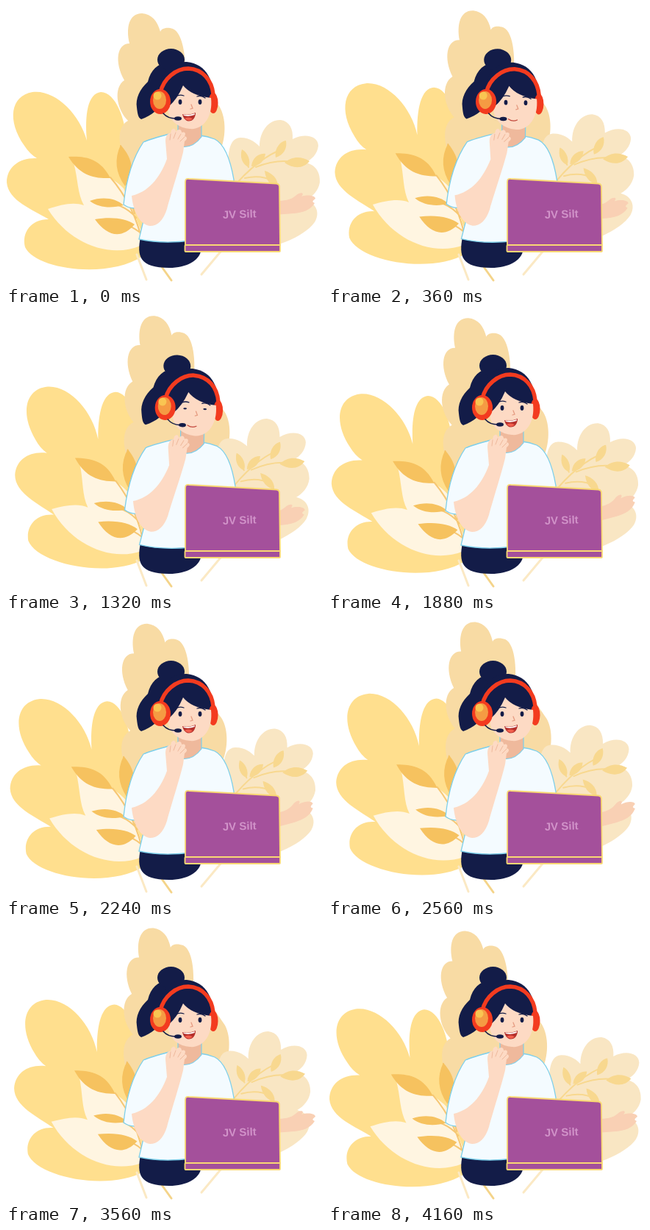
These frames come from a looping animation (430x378 px, 4.2 s). An HTML page:

```html
<!DOCTYPE html>
<html lang="en">
<head>
<meta charset="utf-8">
<title>Support agent</title>
<style>
html, body { margin: 0; width: 100%; height: 100%; overflow: hidden; background: #fff; }
svg { display: block; }
.line { fill: none; stroke-linecap: round; }
.navy { fill: #131c48; }
.red { fill: #f33b1f; }
.skin { fill: #fddac4; }
.gold { fill: #f6c25f; }
.sprig { fill: #f8d88f; }
</style>
</head>
<body>
<svg width="430" height="378" viewBox="0 0 430 378">
  <g id="leftLeaf" fill="#ffdf8e">
    <path d="M110 183C100 146 66 113 36 117C6 122 1 156 25 190Q32 201 42 207C18 206 1 219 1 240C3 265 37 277 58 290C34 290 21 308 26 328C40 358 138 372 186 340L190 260L164 190C164 155 149 117 129 117C111 119 107 148 110 183Z"/>
  </g>
  <g id="backLeaf" fill="#f8dba4">
    <path d="M185 10C167 10 163 30 168 51C151 51 147 76 161 101C146 111 150 140 166 156C150 165 152 190 165 215L230 300L290 200C300 180 300 152 290 136L262 100L243 100C246 78 242 37 227 31C218 28 211 31 210 35C206 20 198 11 185 10Z"/>
  </g>
  <g id="sideStem">
    <path fill="#fff5e1" d="M92 213C112 218 145 232 160 248L184 306L183 326C140 344 85 322 57 276C75 270 92 266 106 271C97 255 98 235 92 213Z"/>
    <path class="line" stroke="#f6c774" stroke-width="2" d="M142 233Q174 270 186 322M156 190Q161 240 175 282M120 267Q158 265 177 288M126 293Q160 291 181 307"/>
    <path class="gold" d="M85 205C108 204 128 207 142 234C119 235 100 230 85 205ZM156 189C147 208 149 227 162 245C175 227 174 209 156 189ZM114 265C131 259 149 261 160 271C144 275 127 275 114 265ZM121 290C144 286 164 289 175 297C158 317 138 314 121 290Z"/>
  </g>
  <g id="rightLeaf" fill="#f9e6c3">
    <path d="M300 230C304 212 299 180 319 179C333 179 341 187 345 191C345 170 358 154 374 155C386 157 391 167 390 181C407 172 425 177 425 190C424 201 416 209 407 213C420 215 428 225 427 240C425 252 416 260 408 264C424 269 427 283 420 294C406 314 360 333 320 333Z"/>
  </g>
  <g id="sprig">
    <path class="line" stroke="#f8d88f" stroke-width="2" d="M306 250Q343 206 378 194M330 219L325 208M343 211L347 204M340 219Q370 207 397 213M325 234Q347 229 364 238"/>
    <path class="sprig" d="M321 195C329 199 334 211 330 219C321 215 318 205 321 195ZM353 201C346 200 335 205 334 218C345 218 352 210 353 201ZM381 183C373 184 365 194 367 206C378 203 383 193 381 183ZM379 213C389 204 402 204 413 211C405 221 392 222 379 213ZM352 224C362 227 371 235 370 247C360 245 353 236 352 224Z"/>
  </g>
  <path class="line" stroke="#fbe9c4" stroke-width="3" d="M178 338L191 372M266 365L292 334"/>
  <path class="line" stroke="#f4d48a" stroke-width="3" d="M205 345L225 373"/>
  <path class="navy" d="M183 314C178 340 181 356 222 356C246 356 262 346 265 334V314Z"/>
  <path id="palm" fill="#f9d0b4" d="M366 265C379 265 387 264 394 258C401 252 407 254 402 259C411 256 421 258 421 262C417 265 416 266 420 268C414 278 403 281 392 282L366 284Z"/>
  <g id="torso">
    <path fill="#f4fbff" stroke="#7dcfea" stroke-width="1.3" d="M222 174C207 178 196 181 187 185C170 210 163 241 160 270Q167 275 175 275L187 292L181 317Q212 324 252 319H310V236C305 207 296 187 284 181Q274 177 264 176Z"/>
    <path fill="#efb99c" stroke="#7dcfea" stroke-width="1.2" d="M234 160V190Q252 196 266 178V155Z"/>
  </g>
  <g id="head">
    <path class="navy" d="M222 76C206 78 197 87 193 103C182 113 176 126 178 138C179 147 180 152 184 154C198 149 209 140 216 126L240 85Z"/>
    <ellipse class="navy" cx="224.500" cy="73" rx="18.500" ry="15"/>
    <path class="navy" d="M207 130C205 95 221 75 246 76C273 79 285 101 281 137H215Z"/>
    <ellipse class="red" cx="282" cy="132" rx="6.500" ry="14"/>
    <path class="skin" d="M221 137Q233 127 241 108Q252 122 279 125C282 151 268 169 250 167C236 166 225 158 221 145Z"/>
    <path class="line" stroke="#f33b1f" stroke-width="5.500" d="M210 118C214 98 232 85 248 85C268 86 280 101 282 120"/>
    <ellipse class="red" cx="210" cy="130" rx="14" ry="17"/>
    <ellipse cx="209" cy="128" rx="9" ry="12" fill="#f59b43"/>
    <circle cx="206" cy="122" r="5.5" fill="#f9c552"/>
    <path class="line" stroke="#131c48" stroke-width="1.5" d="M214 146Q220 153 231 153"/>
    <ellipse class="navy" cx="234" cy="153" rx="5" ry="2.7"/>
    <path class="line" stroke="#131c48" stroke-width="1.3" d="M231 123Q236 120 242 122M260 123Q266 121 271 125"/>
    <path class="line" stroke="#e59c82" stroke-width="1.3" d="M252 134L254 139L251 140"/>
    <ellipse class="navy eye" cx="237" cy="130.500" rx="2.4" ry="3.4"/>
    <ellipse class="navy eye" cx="264" cy="130.500" rx="2.4" ry="3.4"/>
    <g id="talk">
      <path fill="#b5302c" d="M240 147Q249 149 258 145C258 152 254 157 248 156.500C244 156 241 152 240 147Z"/>
      <path fill="#fff" d="M241 147.500Q249 149 257 146L256.500 148Q249 151 242 149Z"/>
      <path fill="#f2604e" d="M243 153Q249 150 254 153.500Q249 158 243 153Z"/>
    </g>
    <path id="smile" class="line" stroke="#c2473c" stroke-width="1.2" d="M241 153Q247 157 253 154"/>
  </g>
  <g id="arm">
    <path class="skin" d="M171 258C193 253 209 235 219 208L217 184C217 176 221 172 224 173L225 169C228 165 231 167 231 171C235 166 239 168 239 172C244 170 245 174 243 177C248 178 246 182 243 184L241 199C236 220 224 257 219 276C214 292 206 299 196 299C181 297 173 278 171 258Z"/>
    <path class="line" stroke="#efb99c" stroke-width="1" d="M224 174L223 182M231 172L228 180M238 174L234 181M243 178L237 184"/>
  </g>
  <g fill="#a4509b" stroke="#f9d873" stroke-width="1.8" stroke-linejoin="round">
    <path d="M244 239Q244 234 249 235L368 241.500Q372 242 372 246L373 325H244Z"/>
    <rect x="243.500" y="325" width="129.500" height="9" rx="1"/>
  </g>
  <text transform="translate(295 289) rotate(-2)" font-family="'Liberation Sans', Arial, sans-serif" font-weight="700" font-size="15" fill="#d193c9">JV Silt</text>
</svg>
<script>
const LOOP = 4200, SPLIT = 2060;
const $ = id => document.getElementById(id);
const eyes = document.querySelectorAll('.eye');

const smooth = (a, b, t) => {
  const u = Math.min(1, Math.max(0, (t - a) / (b - a)));
  return u * u * (3 - 2 * u);
};
const turn = (id, deg, x, y, shift = '') =>
  $(id).setAttribute('transform', `${shift}rotate(${deg} ${x} ${y})`);

// Leaves spring up quickly, then sink back
function sway(t) {
  const len = t < SPLIT ? SPLIT : LOOP - SPLIT;
  const u = (t < SPLIT ? t : t - SPLIT) / len, peak = 0.47;
  return u < peak
    ? 1 - (1 - u / peak) ** 2.4
    : Math.cos(Math.PI / 2 * (u - peak) / (1 - peak)) ** 0.85;
}

function draw(t) {
  const s = sway(t);
  turn('backLeaf', 4.2 * s, 267, 270);
  turn('leftLeaf', 5 * s, 245, 375);
  turn('sideStem', 3.4 * s, 210, 370);
  turn('rightLeaf', -3.6 * s, 185, 488);
  turn('sprig', -3.2 * s, 250, 340);

  const lean = smooth(200, 700, t) - smooth(950, 1550, t);
  turn('torso', 3.5 * lean, 212, 345);
  turn('arm', 4 * lean, 212, 345);
  turn('head', 5 * lean, 212, 365);

  const tuck = Math.sqrt(Math.max(0, lean));
  const lift = smooth(1500, 1900, t) - smooth(2400, 3500, t);
  turn('palm', -11 * lift, 370, 275, `translate(${-25 * tuck} ${13 * tuck})`);

  const quiet = t > 300 && t < 1480;
  $('talk').style.display = quiet ? 'none' : '';
  $('smile').style.display = quiet ? '' : 'none';
  const shut = Math.max(0, 1 - Math.abs(t - 1340) / 100);
  for (const eye of eyes) eye.setAttribute('ry', 3.4 - 2.8 * shut);
}

const start = performance.now();
function tick() {
  draw((performance.now() - start) % LOOP);
  requestAnimationFrame(tick);
}
tick();
</script>
</body>
</html>
```
